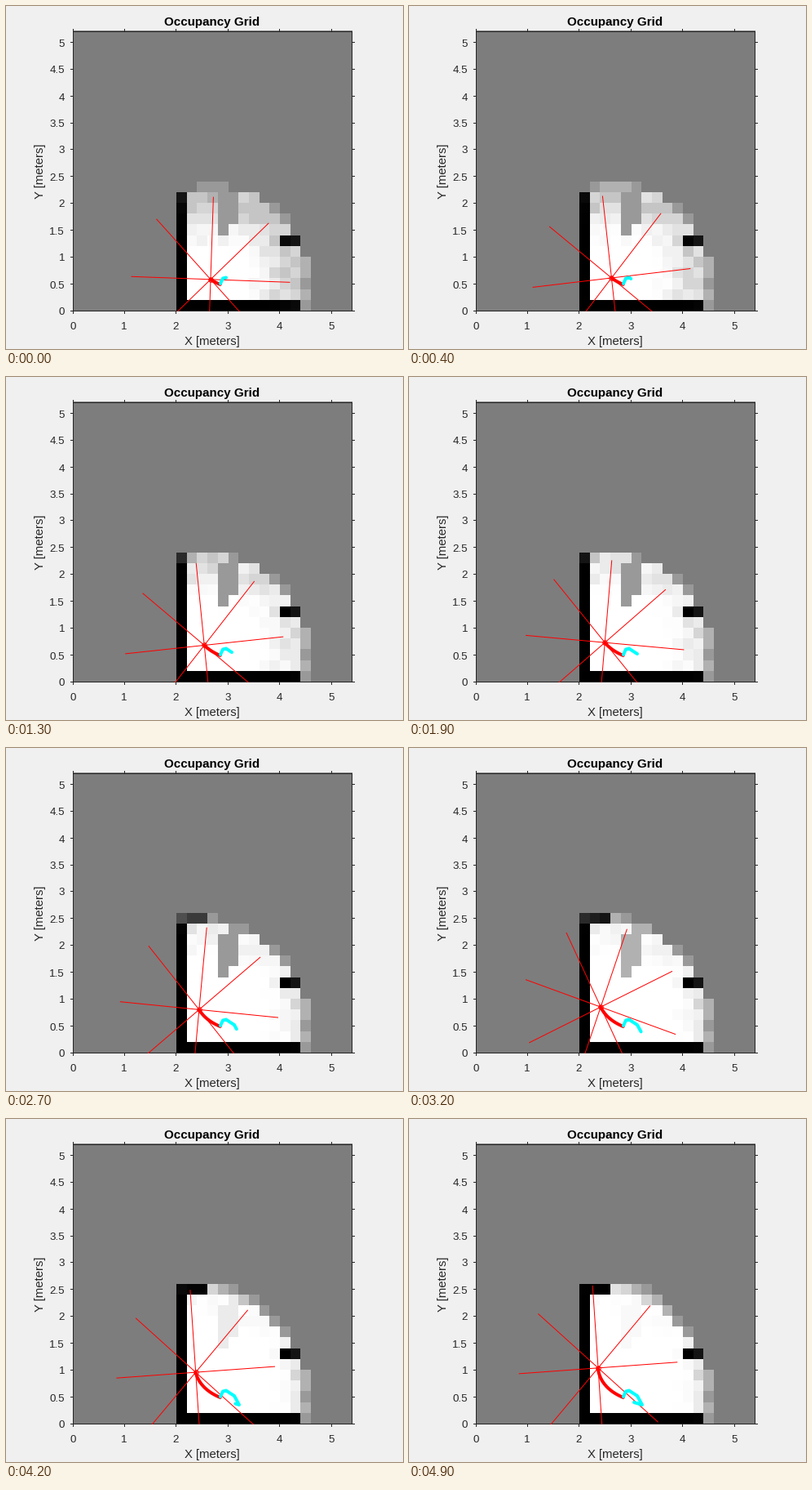
A matplotlib script that plays this animation: 487 by 420 pixels, repeating every 5000 ms.

```python
import numpy as np
import matplotlib.pyplot as plt
from matplotlib.animation import FuncAnimation

W, H, DPI = 487, 420, 100
FRAMES, STEP_MS = 50, 100
PX = 72 / DPI                                   # one pixel in points
LEFT, TOP, RIGHT, BOTTOM = 81.6, 30.7, 424.0, 372.8
COLS, ROWS, CELL = 27, 26, 0.2
SX, SY = (RIGHT - LEFT) / 5.4, (BOTTOM - TOP) / 5.2
INK = "#262626"

START, END = -1.6, 4.9                          # the drive begins before the loop
BEAM, REACH = 1.53, 1.77                        # metres
MISS, FULL = 0.405, 17                          # log-odds per pass, saturation
UNKNOWN = 0.49

HEADING = np.array([(0, 133), (0.8, 150), (1.9, 130), (2.7, 129.5),
                    (3.6, 104.6), (4.2, 94)]).T
DRIFT = np.array([(START, 263, 340), (-0.6, 266, 333.5), (0, 270, 332.5),
                  (0.8, 274.5, 335.5), (1.9, 280, 339), (3.6, 286, 350),
                  (END, 276, 347)]).T

col, row = np.meshgrid(np.arange(COLS), np.arange(ROWS))
cell_x, cell_y = (col + 0.5) * CELL, (row + 0.5) * CELL
inside = (col >= 10) & (row <= 12)
wall = ((col == 10) | ((row == 0) & (col < 22)) | ((row == 12) & (col < 13))
        | ((row == 6) & ((col == 20) | (col == 21))))
# narrow leaning strip that the beams miss until late
shadow = (cell_y > 1.4) & (abs(cell_x - 2.9 - 0.25 * (cell_y - 1.5)) < 0.16)
density = np.random.default_rng(4).uniform(0.7, 1.3, col.shape)


def pose(t):
    """Robot position in pixels: slows down sideways, speeds up upwards."""
    return 232 + 19 * ((END - t) / END) ** 1.7, 334.8 - 4.4 * t - 0.35 * t * t


def drift(t):
    return np.interp(t, DRIFT[0], DRIFT[1]), np.interp(t, DRIFT[0], DRIFT[2])


def past(t):
    return START + np.arange(round((t - START) * 10) + 1) / 10


def grid_at(t):
    """Brightness of every map cell after all scans up to time t."""
    score = np.zeros(col.shape)
    for x, y in zip(*pose(past(t))):
        dist = np.hypot(cell_x - (x - LEFT) / SX, cell_y - (BOTTOM - y) / SY)
        score += (dist < REACH) * 0.4 / np.maximum(dist, 0.2) ** 1.6
    score *= np.where(wall, -2.5, density) * inside
    score = np.where(shadow, np.minimum(score, 1 + 4 * max(0, t - 3)), score)
    score = np.clip(np.round(score), -FULL, FULL)
    return np.where(score == 0, UNKNOWN, 1 / (1 + np.exp(-MISS * score)))


def label(x, y, text, size, color=INK, va="baseline", **style):
    ax.text(x, y, text, fontsize=size * PX, family="Liberation Sans",
            color=color, va=va, **style)


def rule(xs, ys):
    ax.plot(xs, ys, color=INK, lw=PX, solid_capstyle="butt", snap=False)


fig = plt.figure(figsize=(W / DPI, H / DPI), dpi=DPI, facecolor="#f0f0f0")
ax = fig.add_axes([0, 0, 1, 1])
ax.axis("off")
image = ax.imshow(grid_at(0), cmap="gray", vmin=0, vmax=1, origin="lower",
                  interpolation="nearest", aspect="auto",
                  extent=(LEFT, RIGHT, BOTTOM, TOP))
ax.set_xlim(0, W)
ax.set_ylim(H, 0)

x0, x1, y0, y1 = 82.5, 424.5, 31.5, 373.5
for y in (y0, y1):
    rule([x0 - 0.5, x1 + 0.5], [y, y])
for x in (x0, x1):
    rule([x, x], [y0, y1])
for v in range(6):
    x = np.floor(LEFT + v * SX + 0.5) + 0.5
    rule([x, x], [y1, y1 + 3.5])
    rule([x, x], [y0 - 3.5, y0])
    label(x - 0.5, 396.5, str(v), 13.33, ha="center")
for v in np.arange(0, 5.1, 0.5):
    y = np.floor(BOTTOM - v * SY + 0.5) + 0.5
    rule([x0 - 3.5, x0], [y, y])
    rule([x1, x1 + 3.5], [y, y])
    label(72, y + 5, f"{v:g}", 13.33, ha="right")
label(253, 24, "Occupancy Grid", 15.1, color="black", weight="bold", ha="center")
label(253, 415.5, "X [meters]", 14.9, ha="center")
label(49, 202, "Y [meters]", 14.9, rotation=90, ha="right", va="center")

stage = plt.Rectangle((82, 31), 343, 343, transform=ax.transData)
beams = [ax.plot([], [], color="red", lw=PX)[0] for _ in range(8)]
for beam in beams:
    beam.set_clip_path(stage)
thick = dict(lw=4 * PX, solid_capstyle="round", solid_joinstyle="round")
red_trail, = ax.plot([], [], color="red", **thick)
cyan_trail, = ax.plot([], [], color="cyan", **thick)
robot, = ax.plot([], [], "o", ms=5.5 * PX, mfc="none", mec="red", mew=PX)


def draw(i):
    t = i * STEP_MS / 1000
    image.set_data(grid_at(t))
    x, y = pose(t)
    angles = np.radians(np.interp(t, *HEADING) + 45 * np.arange(8))
    for beam, a in zip(beams, angles):
        beam.set_data([x, x + BEAM * SX * np.cos(a)], [y, y - BEAM * SY * np.sin(a)])
    red_trail.set_data(*pose(past(t)))
    cyan_trail.set_data(*drift(past(t)))
    robot.set_data([x], [y])
    return [image, red_trail, cyan_trail, robot, *beams]


anim = FuncAnimation(fig, draw, frames=FRAMES, interval=STEP_MS,
                     repeat=True, repeat_delay=0)
plt.show()
```
